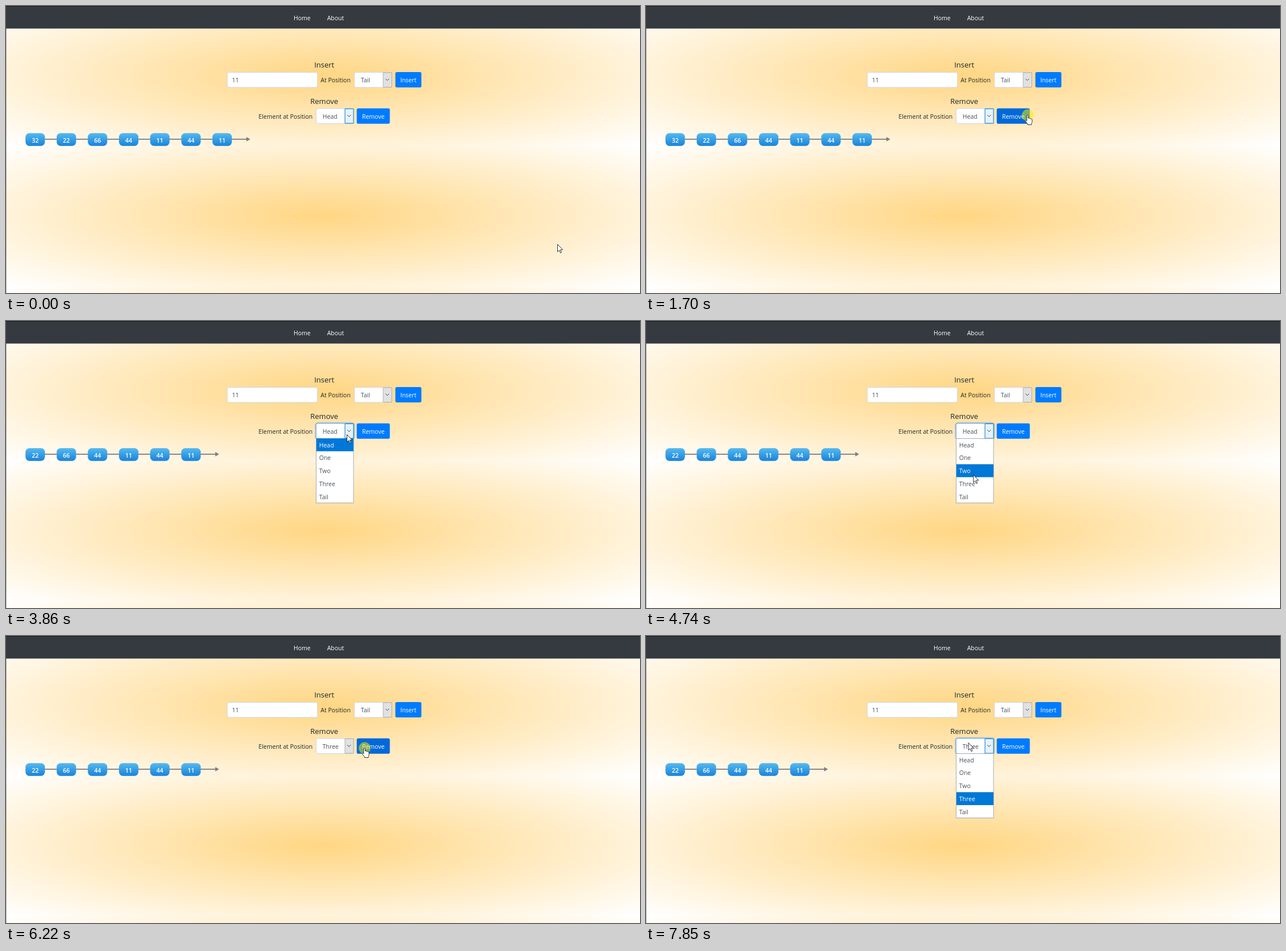
Recreate the animation shown at these times as an HTML page with a canvas. Size 1111 by 504 pixels, loop 8000 ms.

```html
<!DOCTYPE html>
<html lang="en">
<head>
<meta charset="utf-8">
<title>Linked list</title>
<style>
html, body { margin: 0; width: 100%; height: 100%; overflow: hidden; }
canvas {
  display: block; width: 1111px; height: 504px;
  background: radial-gradient(#ffd683, #fff) 0 0 / 1111px 245.5px;
}
</style>
</head>
<body>
<canvas id="stage" width="1111" height="504"></canvas>
<script>
const ctx = document.getElementById('stage').getContext('2d');
const LOOP = 8000;
const FONT = '"Open Sans", "Noto Sans", sans-serif';
const INK = '#212529', FIELD = '#495057';

// Pointer path: time, x, y of the hot spot
const PATH = [
  [0, 966, 418], [380, 692, 182], [480, 692, 182], [780, 606, 188],
  [1080, 645, 191], [1320, 645, 191], [1620, 668.5, 191], [1860, 668.5, 191],
  [2170, 638.5, 202], [3160, 638.5, 202], [3240, 620.5, 199], [3480, 597, 199],
  [3960, 597, 199], [4830, 570.5, 278], [5380, 570.5, 278], [5670, 621.5, 194],
  [5820, 628, 196], [6770, 628, 196], [6930, 602, 186], [7000, 602, 186],
  [7470, 564.5, 187], [LOOP, 564.5, 187]
];
const PRESSES = [[1620, 1860], [3630, 3860], [4970, 5220], [6220, 6460], [7620, 7850]];
const ITEMS = ['Head', 'One', 'Two', 'Three', 'Tail'];

// Each removal: values before it, removed index, time of the click sequence
const REMOVALS = [
  { values: [32, 22, 66, 44, 11, 44, 11], index: 0, start: 1390 },
  { values: [22, 66, 44, 11, 44, 11], index: 3, start: 5990 }
];
const LAST = [22, 66, 44, 44, 11];
const FADE = [540, 780], NUDGE = [850, 930], SNAP = 1080;

const within = (t, a, b) => t >= a && t < b;
const ramp = (t, [a, b]) => Math.min(1, Math.max(0, (t - a) / (b - a)));

function pointerAt(t) {
  const i = Math.max(1, PATH.findIndex(k => k[0] > t));
  const [a, b] = [PATH[i - 1], PATH[i]];
  const p = ramp(t, [a[0], b[0]]);
  return { x: a[1] + (b[1] - a[1]) * p, y: a[2] + (b[2] - a[2]) * p };
}

function text(str, x, y, color = INK, size = 10.5, weight = 400, align = 'left') {
  ctx.font = `${weight} ${size}px ${FONT}`;
  ctx.textAlign = align;
  ctx.fillStyle = color;
  ctx.fillText(str, x, y);
}

function box(x, y, w, h, r, fill, stroke) {
  ctx.beginPath();
  ctx.roundRect(x, y, w, h, r);
  if (fill) {
    ctx.fillStyle = fill;
    ctx.fill();
  }
  if (stroke) {
    ctx.strokeStyle = stroke;
    ctx.lineWidth = 1;
    ctx.stroke();
  }
}

function ring(x, y, w, h, alpha) {
  ctx.beginPath();
  ctx.roundRect(x - 1.15, y - 1.15, w + 2.3, h + 2.3, 4);
  ctx.strokeStyle = `rgba(0,123,255,${alpha})`;
  ctx.lineWidth = 2.3;
  ctx.stroke();
}

function button(label, x, y, w, hover, focus) {
  box(x, y, w, 27, 2.8, hover ? '#0069d9' : '#007bff');
  if (focus) ring(x, y, w, 27, 0.5);
  text(label, x + w / 2, y + 18.2, '#fff', 10.5, 400, 'center');
}

function select(label, x, y, hot, focus) {
  box(x, y, 65.5, 26.5, 2.8, '#fff', focus ? '#80bdff' : '#ced4da');
  if (focus) ring(x, y, 65.5, 26.5, 0.3);
  text(label, x + 11.3, y + 17.9, FIELD);
  box(x + 50.5, y + 0.5, 15, 25.5, 0, hot ? '#e5f1fb' : '#e1e1e1', hot ? '#0078d7' : '#adadad');
  ctx.beginPath();
  ctx.moveTo(x + 54.7, y + 11.3);
  ctx.lineTo(x + 57.7, y + 14.3);
  ctx.lineTo(x + 60.7, y + 11.3);
  ctx.strokeStyle = '#444';
  ctx.stroke();
}

function menu(active) {
  const row = 22.75;
  box(543.5, 206.5, 65.5, 113, 0, '#fff', '#a3abb3');
  ITEMS.forEach((item, i) => {
    const y = 206 + i * row, on = i === active;
    if (on) box(544, y, 65, row, 0, '#0078d7');
    text(item, 548.7, y + 15.6, on ? '#fff' : FIELD);
  });
}

function node(value, i, alpha, grow) {
  const x = 34.2 + i * 54.6;
  ctx.globalAlpha = alpha;
  ctx.fillStyle = '#7d7d80';
  ctx.fillRect(x + 33, 233, 28, 1.8);
  ctx.beginPath();
  ctx.moveTo(x + 59.5, 230);
  ctx.lineTo(x + 66.2, 233.9);
  ctx.lineTo(x + 59.5, 237.8);
  ctx.fill();
  const fill = ctx.createLinearGradient(0, 223, 0, 246);
  fill.addColorStop(0, '#54bbee');
  fill.addColorStop(1, '#1a82da');
  box(x - grow, 223.2, 34 + grow, 22.6, 7, fill);
  text(value, x + 17, 239.8, '#fff', 10.5, 600, 'center');
  ctx.globalAlpha = 1;
}

function list(t) {
  const job = REMOVALS.find(r => t < r.start + SNAP);
  if (!job) {
    LAST.forEach((v, i) => node(v, i, 1, 0));
    return;
  }
  const alpha = 1 - ramp(t - job.start, FADE);
  const grow = 6 * ramp(t - job.start, NUDGE);
  job.values.forEach((v, i) => {
    node(v, i, i === job.index ? alpha : 1, i === job.index + 1 ? grow : 0);
  });
}

const ARROW = new Path2D('M.5 .5V13.6L3.5 10.8L5.5 15.6L7.5 14.7L5.5 10H9.6Z');
const HAND = new Path2D(
  'M3.2 10.8V1.9Q3.2 .6 4.5 .6Q5.8 .6 5.8 1.9V6Q7.8 5.2 8.3 6.6Q10 6 10.5 7.3' +
  'Q12.6 7 12.6 8.8V12.6Q12.6 14 11.4 15.4V17.5H4.8V16L1 11.6Q.2 10.2 1.2 9.7Q2 9.4 3.2 10.8Z');

function pointer({ x, y }) {
  const hand = x >= 614.5 && x <= 672.5 && y >= 180 && y <= 207;
  const shape = hand ? HAND : ARROW;
  ctx.save();
  ctx.translate(hand ? x - 4.5 : x, y);
  ctx.fillStyle = '#fff';
  ctx.fill(shape);
  ctx.strokeStyle = '#1c1c24';
  ctx.lineWidth = 0.9;
  ctx.lineJoin = 'round';
  ctx.stroke(shape);
  ctx.restore();
}

function draw(t) {
  const at = pointerAt(t);
  ctx.clearRect(0, 0, 1111, 504);

  ctx.fillStyle = '#343a40';
  ctx.fillRect(0, 0, 1111, 39.6);
  ctx.fillStyle = '#181b1e';
  ctx.fillRect(0, 0, 1111, 1);
  ctx.fillStyle = 'rgba(60,60,60,.4)';
  ctx.fillRect(0, 0, 1, 504);
  text('Home', 504, 25, '#fff');
  text('About', 562.7, 25, '#fff');

  text('Insert', 557.7, 108.4, INK, 13, 400, 'center');
  box(387.8, 116.5, 158, 26.5, 2.8, '#fff', '#ced4da');
  text('11', 396, 134.3, FIELD);
  text('At Position', 551.3, 134.3);
  select('Tail', 610.5, 116.5, false, false);
  button('Insert', 682.3, 116, 45.6, false, false);

  text('Remove', 557.7, 172.1, INK, 13, 400, 'center');
  text('Element at Position', 442.6, 198);
  const chosen = t < 5220 ? 'Head' : 'Three';
  const picking = within(t, 3630, 5740) || t >= 7620;
  select(chosen, 543.5, 180, !within(t, 5740, 7000), picking);
  button('Remove', 614.6, 179.7, 58,
    within(t, 620, 3630) || within(t, 5740, 7620),
    within(t, 1780, 3630) || within(t, 6380, 7620));

  list(t);

  if (within(t, 3700, 5220)) menu(Math.max(0, Math.floor((at.y - 206) / 22.75)));
  if (t >= 7700) menu(3);

  if (PRESSES.some(([a, b]) => within(t, a, b))) {
    ctx.fillStyle = 'rgba(250,240,0,.52)';
    ctx.beginPath();
    ctx.arc(at.x + 0.5, at.y + 0.8, 10.5, 0, Math.PI * 2);
    ctx.fill();
  }
  pointer(at);
}

let begin;
function tick(now) {
  begin ??= now;
  draw((now - begin) % LOOP);
  requestAnimationFrame(tick);
}
draw(0);
requestAnimationFrame(tick);
</script>
</body>
</html>
```
